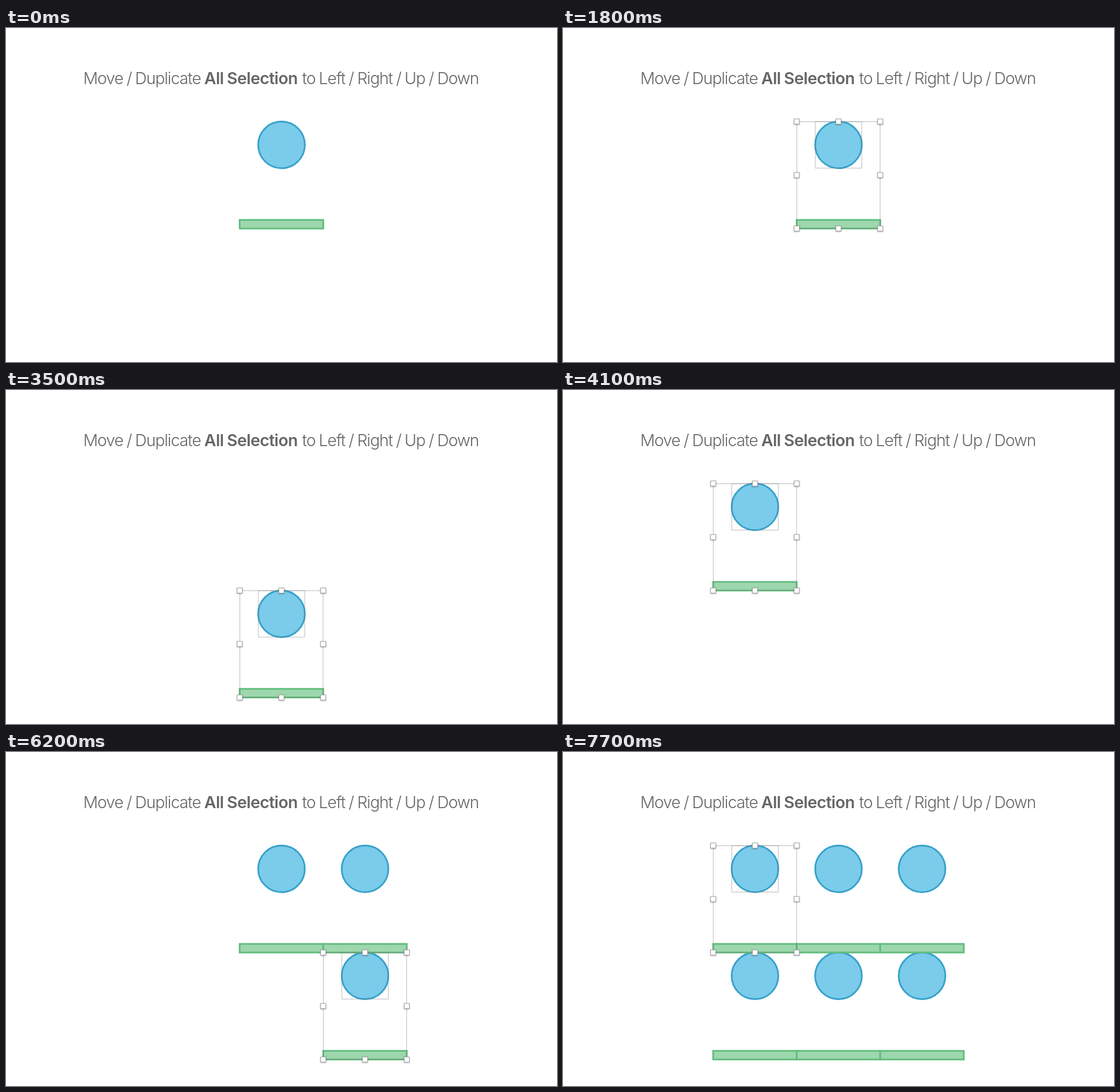
An HTML page for the animation above (8 s loop, 961 by 583 pixels).

```html
<!DOCTYPE html>
<html lang="en">
<head>
<meta charset="utf-8">
<title>Move and duplicate a selection</title>
<style>
  html, body { margin: 0; width: 100%; height: 100%; overflow: hidden; background: #fff; }
  svg { display: block; width: 100%; height: 100%; }
  .title {
    font: 300 28.5px Inter, sans-serif;
    font-optical-sizing: none;
    letter-spacing: -1.08px;
    word-spacing: -.9px;
    fill: #666;
    text-anchor: middle;
  }
  .title .strong { font-weight: 600; letter-spacing: -.6px; }
  .disc { fill: #7bcbea; stroke: #37a2cb; stroke-width: 3; }
  .bar { fill: #9ed7ad; stroke: #62bd7e; stroke-width: 3; }
  .outline { fill: none; stroke: #777; stroke-opacity: .5; }
  .faint .outline { stroke-opacity: .35; }
  .handle { fill: #fff; stroke: #999; stroke-width: .9; filter: drop-shadow(0 1px 1px #0005); }
  #cursor { filter: drop-shadow(0 1.5px 1.2px #0006); }
</style>
</head>
<body>
<svg viewBox="0 0 961 583">
  <g class="title">
    <text x="237.2" y="98">Move / Duplicate</text>
    <text class="strong" x="427.2" y="98">All Selection</text>
    <text x="670.5" y="98">to Left / Right / Up / Down</text>
  </g>
  <g id="discs"></g>
  <g id="bars"></g>
  <g id="single" class="faint"></g>
  <g id="pair"></g>
  <path id="cursor" d="M0 0V17.5L4 13.9L7.3 21.7L10.2 20.4L6.9 12.8H12.3Z"
    stroke="#fff" stroke-width="2.4" paint-order="stroke"/>
</svg>
<script>
  const LOOP = 8000, STEP_X = 145.7, STEP_Y = 186.7;
  const LEFT = 407.6, TOP = 163.3;
  const DISC = { x: 439.8, y: TOP, w: 81.5, h: 81.5 };
  const BAR = { x: LEFT, y: 335, w: STEP_X, h: 15 };
  const PAIR = { x: LEFT, y: TOP, w: STEP_X, h: STEP_Y };

  // time, column, row, whether the previous copy stays
  const moves = [
    [0, 0, 0], [2300, 1, 0], [3100, 1, 1], [3400, 0, 1], [3700, -1, 1],
    [4000, -1, 0], [4300, 0, 0], [5800, 1, 0, true], [6200, 1, 1, true],
    [6500, 0, 1, true], [6800, -1, 1, true], [7000, -1, 0, true]
  ];
  // time, x, y; no position hides the pointer
  const pointer = [
    [0], [100, 399, 289], [200, 432, 250], [300, 462, 220], [400, 474, 209],
    [700, 478, 242], [800, 486, 314], [900, 488.5, 349.3], [1700, 503.5, 493], [1800]
  ];

  const byId = id => document.getElementById(id);
  const [discs, bars, single, pair, cursor] =
    ["discs", "bars", "single", "pair", "cursor"].map(byId);

  function add(parent, tag, attributes) {
    const node = document.createElementNS("http://www.w3.org/2000/svg", tag);
    for (const key in attributes) node.setAttribute(key, attributes[key]);
    return parent.appendChild(node);
  }
  const addRect = (parent, cls, { x, y, w, h }) =>
    add(parent, "rect", { class: cls, x, y, width: w, height: h });

  function addOutline(parent, { x, y, w, h }) {
    const inset = .25;
    addRect(parent, "outline", { x: x + inset, y: y + inset, w: w - 2 * inset, h: h - 2 * inset });
  }
  function addHandles(parent, { x, y, w, h }) {
    for (const u of [0, .5, 1]) for (const v of [0, .5, 1]) {
      if (u === .5 && v === .5) continue;
      addRect(parent, "handle", { x: x + u * w - 4.5, y: y + v * h - 4.5, w: 9, h: 9 });
    }
  }
  const place = (node, x, y) => node.setAttribute("transform", `translate(${x} ${y})`);
  const show = (node, on) => node.style.display = on ? "" : "none";
  const lastBefore = (list, t) => list.filter(item => item[0] <= t).pop();

  const cells = [];
  for (const row of [0, 1]) for (const col of [-1, 0, 1]) {
    const disc = add(discs, "circle", { class: "disc", cx: 480.5, cy: 204, r: 40.7 });
    const bar = addRect(bars, "bar", BAR);
    for (const shape of [disc, bar]) place(shape, col * STEP_X, row * STEP_Y);
    cells.push({ col, row, shapes: [disc, bar] });
  }

  addOutline(single, DISC);
  addHandles(single, DISC);
  for (const box of [DISC, PAIR]) addOutline(pair, box);
  addHandles(pair, PAIR);

  function draw(now) {
    const t = now % LOOP;
    const done = moves.filter(move => move[0] <= t);
    const [, col, row] = done[done.length - 1];
    const filled = done.filter((move, i) => i === done.length - 1 || done[i + 1][3]);

    for (const cell of cells) {
      const on = filled.some(move => move[1] === cell.col && move[2] === cell.row);
      cell.shapes.forEach(shape => show(shape, on));
    }
    show(single, t >= 600 && t < 1500);
    show(pair, t >= 1500);
    place(pair, col * STEP_X, row * STEP_Y);

    const [, x, y] = lastBefore(pointer, t);
    show(cursor, x !== undefined);
    if (x !== undefined) place(cursor, x, y);
  }

  const start = performance.now();
  function tick() {
    draw(performance.now() - start);
    requestAnimationFrame(tick);
  }
  tick();
</script>
</body>
</html>
```
